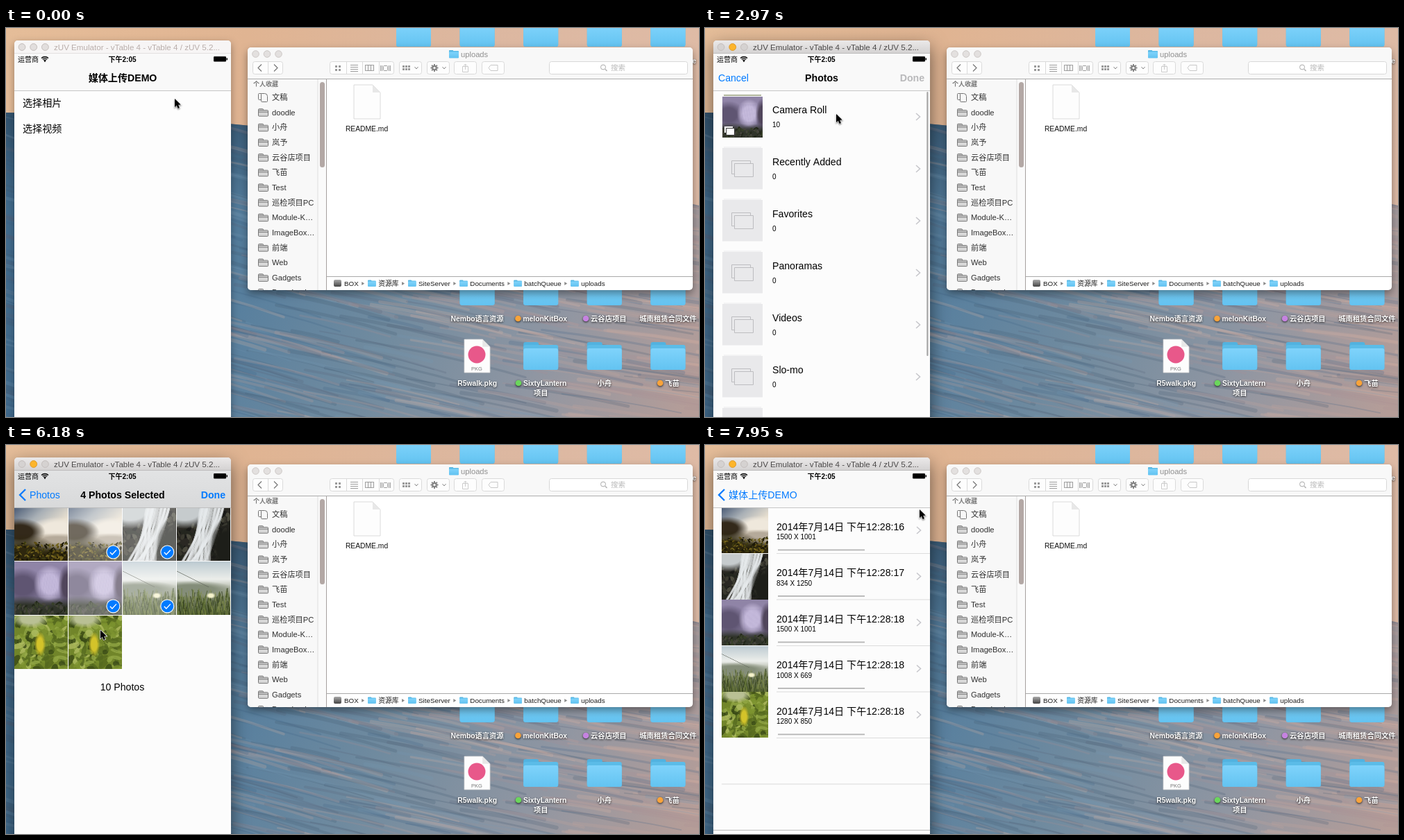
Animation of 998 by 561 pixels, one loop 8 s. Source, as an HTML page with a canvas:

```html
<!DOCTYPE html>
<html lang="zh">
<head>
<meta charset="utf-8">
<title>Media upload demo</title>
<style>
html, body { margin: 0; width: 100%; height: 100%; overflow: hidden; background: #6c859c; }
canvas { display: block; width: 998px; height: 561px; }
</style>
</head>
<body>
<canvas id="stage" width="998" height="561"></canvas>
<script>
const W = 998, H = 561, LOOP = 8000;
const FONT = '"Liberation Sans", "Noto Sans CJK SC", "Noto Sans CJK", sans-serif';
const BLUE = '#007aff';
const stage = document.getElementById('stage').getContext('2d');
let g = stage;

let seed = 7;
const rnd = (a = 0, b = 1) => {
  seed = (seed * 16807) % 2147483647;
  return a + (b - a) * seed / 2147483647;
};
const pick = list => list[Math.floor(rnd() * list.length)];
const times = (n, f) => { for (let i = 0; i < n; i++) f(i); };

// ---------- drawing helpers ----------
function offscreen(w, h, paint) {
  const c = document.createElement('canvas');
  c.width = w; c.height = h;
  const old = g;
  g = c.getContext('2d');
  paint();
  g = old;
  return c;
}
function layer(paint) { g.save(); paint(); g.restore(); }
function box(x, y, w, h, color) { g.fillStyle = color; g.fillRect(x, y, w, h); }
function ink(fill, rim, width = 1) {
  if (fill) { g.fillStyle = fill; g.fill(); }
  if (rim) { g.strokeStyle = rim; g.lineWidth = width; g.stroke(); }
}
function round(x, y, w, h, r, fill, rim) { g.beginPath(); g.roundRect(x, y, w, h, r); ink(fill, rim); }
function disc(x, y, r, fill, rim) { g.beginPath(); g.arc(x, y, r, 0, 7); ink(fill, rim); }
function path(pts) {
  g.beginPath();
  for (let i = 0; i < pts.length; i += 2) g.lineTo(pts[i], pts[i + 1]);
}
function poly(color, ...pts) { path(pts); ink(color); }
function line(color, width, ...pts) { path(pts); ink(null, color, width); }
function curve(color, width, x0, y0, cx, cy, x1, y1) {
  g.beginPath(); g.moveTo(x0, y0); g.quadraticCurveTo(cx, cy, x1, y1);
  ink(null, color, width);
}
function chevron(x, y, w, h, color, width) { line(color, width, x, y - h, x + w, y, x, y + h); }
function fade(x0, y0, x1, y1, ...colors) {
  const f = g.createLinearGradient(x0, y0, x1, y1);
  colors.forEach((c, i) => f.addColorStop(i / (colors.length - 1), c));
  return f;
}
function text(s, x, y, size, color, align = 'left', weight = '') {
  g.font = `${weight} ${size}px ${FONT}`;
  g.textAlign = align;
  g.fillStyle = color;
  g.fillText(s, x, y + size * 0.36);
  return g.measureText(s).width;
}
function shadow(color, blur, dy) { g.shadowColor = color; g.shadowBlur = blur; g.shadowOffsetY = dy; }

// ---------- photos, each in a 100 unit square ----------
function soft(x, y, rx, ry, color) {
  layer(() => {
    g.translate(x, y); g.scale(rx, ry);
    const f = g.createRadialGradient(0, 0, 0.5, 0, 0, 1);
    f.addColorStop(0, color); f.addColorStop(1, color + '00');
    disc(0, 0, 1, f);
  });
}
const specks = (n, top, size, colors) => times(n, () => {
  g.beginPath();
  g.ellipse(rnd(0, 100), rnd(top, 100), rnd(0.5, 1.5) * size, rnd(0.3, 0.7) * size, rnd(0, 3), 0, 7);
  ink(pick(colors));
});
const photos = [
  () => { // wide fall over gold bushes
    box(0, 0, 100, 100, fade(0, 0, 50, 60, '#4a5b75', '#a9b0b6', '#e9e0d0'));
    soft(80, 38, 50, 20, '#efe8dc');
    soft(80, 62, 60, 14, '#b5aa9a');
    soft(10, 46, 48, 26, '#33291a');
    soft(15, 95, 75, 45, '#2e270e');
    soft(75, 100, 60, 34, '#2e270e');
    specks(130, 66, 3, ['#5e4e14', '#75661f', '#1d1908', '#3c3a10']);
  },
  () => { // white streams between rocks
    box(0, 0, 100, 100, '#2a2823');
    specks(120, 10, 6, ['#191917', '#3a392f', '#4b4a3e', '#24261f']);
    soft(15, 8, 55, 32, '#c6cbcd');
    times(40, () => {
      const x = rnd(45, 88), end = rnd(8, 62);
      curve('rgba(232,235,237,.5)', 4, x, 0, x - 8, 40, end, 104);
    });
    soft(92, 75, 32, 55, '#1d1e19');
  },
  () => { // violet fall
    box(0, 0, 100, 100, fade(0, 0, 0, 100, '#8f84a6', '#9387ac', '#4a4658'));
    soft(15, 45, 42, 34, '#5f5572');
    soft(66, 42, 30, 36, '#cdc2e2');
    times(14, i => line('rgba(125,110,160,.25)', 1.5, 46 + i * 3, 20, 50 + i * 3, 65));
    soft(98, 45, 16, 40, '#51465c');
    soft(20, 98, 75, 34, '#30342a');
    soft(85, 98, 50, 30, '#30342a');
    specks(70, 78, 4, ['#38402a', '#23281b', '#45443c']);
  },
  () => { // grass with a flower
    box(0, 0, 100, 100, fade(0, 0, 0, 100, '#bccad1', '#eceeeb', '#7b8468', '#48552c'));
    soft(30, 52, 80, 16, '#848d79');
    times(160, () => {
      const x = rnd(0, 100), y = rnd(68, 112);
      line(pick(['#46572399', '#72823f99', '#2c371699', '#8a925299']), 1.6, x, y, x + rnd(-6, 6), y - 18);
    });
    line('#5d6258', 0.8, 0, 18, 60, 48);
    soft(64, 64, 9, 6, '#f6f3cc');
  },
  () => { // sunlit leaves
    box(0, 0, 100, 100, '#71852a');
    specks(130, 0, 9, ['#93a845cc', '#55691fcc', '#aebb60cc', '#3a4a16cc', '#7d9430cc']);
    soft(30, 6, 35, 18, '#b9c094');
    soft(48, 54, 11, 24, '#d3c32a');
  }
].map(paint => offscreen(160, 160, () => { g.scale(1.6, 1.6); paint(); }));

// ---------- desktop ----------
function folder(x, y, s = 1) {
  layer(() => {
    g.translate(x, y); g.scale(s, s);
    round(0, 0, 22, 12, 3, '#52b2df');
    round(0, 4, 50, 36, 3, '#5bbce8');
    round(0, 9, 50, 31, 3, fade(0, 9, 0, 40, '#7fd3fb', '#63c3f1'));
  });
}
// dot and text are centred together
function caption(s, x, y, dot) {
  layer(() => {
    shadow('rgba(0,0,0,.8)', 3, 1);
    const w = text(s, x + (dot ? 6 : 0), y, 10.3, '#fff', 'center', 'bold');
    if (dot) disc(x - w / 2 - 1, y, 4.3, dot);
  });
}
function paper(x, y, w, h) {
  const r = x + w, fold = w * 0.29;
  g.beginPath();
  path([x, y, r - fold, y, r, y + fold, r, y + h, x, y + h, x, y]);
  ink('#fdfdfd', '#d2d2d2', 0.8);
  poly('#e8e8e8', r - fold, y, r, y + fold, r - fold, y + fold);
}
function wallpaper() {
  box(0, 0, W, H, fade(0, 0, W, 200, '#e5bd99', '#e0b492', '#dcb7a0', '#dfbba6'));
  layer(() => {
    g.beginPath();
    g.moveTo(0, 122); g.quadraticCurveTo(480, 125, W, 256); g.lineTo(W, H); g.lineTo(0, H);
    g.clip();
    box(0, 0, W, H, fade(200, 150, W, 520, '#426c8e', '#577f9e', '#718b9f', '#9096a2', '#b59d98'));
    box(0, 110, W, 150, fade(0, 110, 0, 260, 'rgba(35,62,84,.6)', 'rgba(35,62,84,0)'));
    g.lineCap = 'round';
    times(700, () => {
      const x = rnd(-120, 1030), y = rnd(110, 580);
      const len = rnd(60, 260), drop = len * (0.32 - x * 0.0002);
      const warm = rnd() < x / 1300;
      const color = warm ? pick(['#e0b4a2', '#c8a49c', '#a98f94']) : pick(['#3f566f', '#3c6286', '#7497b2', '#565f76']);
      curve(color + '38', rnd(1, 6), x, y, x + len / 2, y + drop * 0.35, x + len, y + drop);
    });
  });
}
function icons() {
  const col = i => 587 + i * 91.6;
  for (const row of [0, 4, 5])
    for (let i = Math.max(0, row - 3); i < 5; i++) folder(col(i) - 25, row * 93.2 - 13);
  caption('e', 991, 47);
  const orange = '#f9a33a', purple = '#c583e0', green = '#6bd65c';
  [['Nembo语言资源'], ['melonKitBox', orange], ['云谷店项目', purple], ['城南租赁合同文件']]
    .forEach(([s, dot], i) => caption(s, col(i + 1), 419, dot));
  [['R5walk.pkg'], ['SixtyLantern', green], ['小舟'], ['飞苗', orange]]
    .forEach(([s, dot], i) => caption(s, col(i + 1), 512, dot));
  caption('项目', col(2), 526);
  paper(660, 449, 37, 48);
  disc(678, 471, 12.5, '#e8588a');
  text('PKG', 678, 491, 7.5, '#777', 'center');
}
function toolbar() {
  const dark = '#9a9a9a', rim = '#dadada';
  for (const x of [355, 466, 566, 606, 645, 685])
    round(x + 0.5, 48.5, x === 355 ? 43 : x === 466 ? 92 : 32, 18, 3, '#fdfdfd', rim);
  for (const x of [377, 490, 513, 537]) box(x, 49, 1, 18, rim);
  chevron(368, 57.5, -5, 5, '#777', 1.2);
  chevron(386, 57.5, 5, 5, '#777', 1.2);
  times(4, i => {
    box(474 + (i % 2) * 5, 54 + (i >> 1) * 5, 3, 3, dark);
    box(496, 53 + i * 3, 11, 1, dark);
    box(517 + i * 4, 53, 1, 9, dark);
    box(539 + i * 2 + (i > 1) * 8, 54, 1, 8, dark);
  });
  round(517.5, 53.5, 12, 8, 1, null, dark);
  round(543.5, 54.5, 6, 7, 1, null, dark);
  times(6, i => box(571 + (i % 3) * 4, 54 + (i > 2) * 4, 3, 3, dark));
  times(4, i => {
    const c = Math.cos(i * Math.PI / 4) * 5.5, s = Math.sin(i * Math.PI / 4) * 5.5;
    line('#858585', 2, 617 - c, 57.5 - s, 617 + c, 57.5 + s);
  });
  disc(617, 57.5, 3.8, '#858585');
  disc(617, 57.5, 1.6, '#fdfdfd');
  for (const x of [591, 631]) line('#888', 1, x - 2.5, 56, x, 59, x + 2.5, 56);
  round(657.5, 55.5, 8, 8, 0, null, '#ccc');
  line('#ccc', 1, 659, 54.5, 661.5, 52, 664, 54.5);
  box(661, 52, 1, 8, '#ccc');
  line('#c8c8c8', 1, 695, 57.5, 698, 53.5, 708, 53.5, 708, 61.5, 698, 61.5, 695, 57.5);
  round(782.5, 48.5, 199, 18, 3, '#fff', '#d8d8d8');
  disc(860, 56.5, 3.5, null, '#aaa');
  line('#aaa', 1.2, 863, 59.5, 865.5, 62);
  text('搜索', 871, 57.5, 10.5, '#b9b9b9');
}
function sidebar() {
  box(348, 74, 101, 304, '#f8f8f8');
  box(449, 74, 12, 304, '#fafafa');
  box(448.5, 74, 1, 304, '#dedede');
  box(461, 74, 1, 304, '#a5a09e');
  round(452, 78, 7, 123, 3.5, '#b3a8a5');
  text('个人收藏', 356, 81, 9, '#777', 'left', 'bold');
  const names = '文稿 doodle 小舟 岚予 云谷店项目 飞苗 Test 巡检项目PC Module-K… ImageBox… 前端 Web Gadgets Downloads';
  names.split(' ').forEach((s, i) => {
    const y = 100 + i * 21.65, rim = '#737373';
    if (i) {
      round(363.5, y - 5, 7, 4, 1, '#d7d7d7', rim);
      round(363.5, y - 3, 14, 8.5, 1, '#d7d7d7', rim);
      line(rim, 1, 364, y - 0.5, 377, y - 0.5);
    } else {
      round(363.5, 94.5, 7, 9, 1, '#f8f8f8', rim);
      round(367.5, 94.5, 9, 12, [1, 4, 1, 1], '#f8f8f8', rim);
    }
    text(s, 383, y, 11.2, '#2f2f2f');
  });
}
function finder() {
  layer(() => { shadow('rgba(0,0,0,.4)', 12, 5); round(348, 28, 641, 350, 5, '#fff'); });
  layer(() => {
    g.beginPath(); g.roundRect(348, 28, 641, 350, 5); g.clip();
    box(348, 28, 641, 45, '#f8f8f8');
    times(3, i => disc(359.5 + i * 16.5, 37.5, 4.8, '#e3e0df', '#cbc6c4'));
    folder(638, 32, 0.28);
    text('uploads', 655, 38, 11.2, '#8f8f8f');
    toolbar();
    box(348, 73, 641, 1, '#adadad');
    sidebar();
    paper(501, 82, 38, 49);
    text('README.md', 519.5, 145.5, 10.3, '#111', 'center');
    box(462, 358, 527, 1, '#a9a9a9');
    round(472, 363, 11, 10, 2, fade(0, 363, 0, 373, '#aaa', '#444'));
    let x = 472;
    'BOX 资源库 SiteServer Documents batchQueue uploads'.split(' ').forEach((s, i) => {
      if (i) {
        folder(x, 363.5, 0.23);
        poly('#8a8a8a', x - 9, 366, x - 5, 368.5, x - 9, 371);
      }
      x += 28.5 + text(s, x + 15, 368.5, 9.8, '#1c1c1c');
    });
  });
}
const desk = offscreen(W, H, () => { wallpaper(); icons(); finder(); });

// ---------- timing ----------
const tick = t => Math.max(0, Math.floor((t - 30) / 60) * 60 + 30);
function spring(ms) {
  const k = ms * 0.0285;
  return k <= 0 ? 0 : k > 7 ? 1 : 1 - (1 + k) * Math.exp(-k);
}
const ACTIVE = 1770, TAP = 2030, OPEN = 2346, ROLL = 4280, DONE = 6740, CLOSE = 6912, RESULTS = 7640;

// pointer moves: start, end, x, y
const moves = [
  [0, 210, 249, 103], [930, 1590, 80, 111], [2110, 2550, 206, 112], [2790, 2970, 189, 124],
  [4330, 4700, 133, 123], [5190, 5320, 212, 125], [5400, 5540, 212, 205], [5610, 5730, 136, 205],
  [5800, 6150, 136, 267], [6310, 6560, 301, 66], [DONE, 6990, 327, 84], [7400, 7860, 309, 93]
];
// photos tapped: time, cell
const taps = [[4890, 1], [5340, 2], [5600, 6], [5795, 5], [6240, 9]];

function pointer(t) {
  let x = 243, y = 102;
  for (const [a, b, tx, ty] of moves) {
    const u = Math.min(1, Math.max(0, (t - a) / (b - a))), e = u * u * (3 - 2 * u);
    x += (tx - x) * e;
    y += (ty - y) * e;
  }
  layer(() => {
    g.translate(x, y);
    shadow('rgba(0,0,0,.4)', 2, 1);
    path([0, 0, 0, 12, 2.8, 9.5, 4.7, 14, 6.9, 13, 5, 8.7, 8.7, 8.6, 0, 0]);
    ink(null, '#fff', 1.6);
    ink('#000');
  });
}

// ---------- phone ----------
const ui = (s, x, y, color = '#000', align, weight) => text(s, x, y, 14.1, color, align, weight);
const title = s => ui(s, 168, 72, '#000', 'center', 'bold');
const more = (x, y) => chevron(x, y, 5.5, 5, '#c7c7cc', 1.6);
function bar(color) {
  box(12, 37, 312, 53.5, color);
  box(12, 90, 312, 0.8, '#b9b9b9');
}
function back(s) {
  chevron(28, 72, -8, 8, BLUE, 2.3);
  ui(s, 34, 72, BLUE);
}
function shifted(dx, alpha, paint) {
  if (alpha > 0) layer(() => { g.globalAlpha = alpha; g.translate(dx, 0); paint(); });
}
// slides the next page in over the current one
function push(p, current, next) {
  if (p < 1) layer(() => {
    g.translate(-94 * p, 0);
    current();
    box(12, 37, 406, 524, `rgba(0,0,0,${0.1 * p})`);
  });
  if (p > 0) layer(() => { g.translate(312 * (1 - p), 0); box(12, 37, 312, 524, '#fcfcfc'); next(); });
}

function menu(t) {
  box(12, 37, 312, 524, '#fdfdfd');
  if (t >= ACTIVE) for (let y = 126; y < H; y += 36.6) box(24, y, 300, 1, '#e0e0e0');
  if (t >= TAP) box(12, 90.5, 312, 36, '#d9d9d9');
  ui('选择相片', 24, 108);
  ui('选择视频', 24, 144.5);
}
function results() {
  const sizes = ['1500 X 1001', '834 X 1250', '1500 X 1001', '1008 X 669', '1280 X 850'];
  sizes.forEach((size, i) => {
    const y = 90 + i * 66.5;
    g.drawImage(photos[i], 24, y, 67, 66);
    ui('2014年7月14日 下午12:28:' + Math.min(18, 16 + i), 103, y + 27.5);
    text(size, 103, y + 42.5, 10, '#000');
    box(105, y + 60.5, 125, 1.8, '#b5b5b5');
    more(305, y + 33);
    box(103, y + 66, 221, 1, '#dcdcdc');
  });
  box(24, 488.5, 300, 1, '#dcdcdc');
  box(12, 555, 312, 1, '#bcbcbc');
}
function albums(t) {
  box(12, 37, 312, 524, '#fcfcfc');
  if (t >= 3840) box(12, 90.5, 312, 75, '#d9d9d9');
  ['Camera Roll', 'Recently Added', 'Favorites', 'Panoramas', 'Videos', 'Slo-mo', 'Bursts'].forEach((s, i) => {
    const y = 90 + i * 75, pale = '#e9e9eb';
    box(27, y + 6.5, 54, 1, i ? '#ececee' : '#66703f');
    if (i) {
      box(25, y + 8, 58, 59.5, pale);
      round(38.5, y + 26.5, 27, 19, 0, pale, '#bdbdc0');
      round(42.5, y + 30.5, 27, 19, 0, pale, '#bdbdc0');
    } else {
      g.drawImage(photos[2], 25, 98.5, 58, 59);
      box(28, 142, 12, 9, '#fff');
      round(30.5, 144.5, 12, 10, 0, '#fff', '#333');
    }
    ui(s, 97, y + 28);
    text(i ? '0' : '10', 97, y + 49.5, 10, '#000');
    more(304, y + 38);
  });
  if (t >= 2850 && t < 3650) round(319.3, 92, 2.2, 381, 1, '#a5a5a5');
}
function grid(tapped) {
  times(10, i => {
    const x = 12 + (i % 4) * 77.9, y = 90 + Math.floor(i / 4) * 77.9;
    g.drawImage(photos[i >> 1], x, y, 77, 77);
    if (!tapped.includes(i)) return;
    box(x, y, 77, 77, 'rgba(255,255,255,.3)');
    disc(x + 64.5, y + 64.5, 10, '#fff');
    disc(x + 64.5, y + 64.5, 8.9, BLUE);
    line('#fff', 1.4, x + 60, y + 64.8, x + 63, y + 68, x + 69, y + 61.5);
  });
  ui('10 Photos', 167.5, 349, '#000', 'center');
}
function picker(t) {
  const p = spring(t - ROLL);
  const tapped = taps.filter(k => t >= k[0]).map(k => k[1]), n = tapped.length;
  push(p, () => albums(t), () => grid(tapped));
  bar(n ? fade(0, 37, 0, 90, '#e2e3e4', '#d8d9da') : '#f9f9f9');
  shifted(-110 * p, 1 - p, () => title('Photos'));
  shifted(0, 1 - p, () => ui('Cancel', 19, 72, BLUE));
  shifted(130 * (1 - p), p, () => back('Photos'));
  shifted(150 * (1 - p), p, () => title(n ? `${n} Photo${n > 1 ? 's' : ''} Selected` : 'Camera Roll'));
  ui('Done', 316, 72, !n ? '#b9b9bb' : t > DONE ? '#62a9f5' : BLUE, 'right', 'bold');
}
function status() {
  text('运营商', 17, 45, 10, '#000');
  times(3, i => {
    g.beginPath(); g.arc(56, 48.5, 2.2 + i * 2.4, -2.35, -0.79);
    ink(null, '#000', 1.5);
  });
  disc(56, 48, 1, '#000');
  text('下午2:05', 167.5, 45, 10, '#000', 'center', 'bold');
  round(299, 41, 18, 7.5, 1.2, '#000');
  box(317.5, 43.3, 1.5, 3, '#000');
}
function frameOf(active) {
  const top = [5, 5, 0, 0];
  layer(() => {
    shadow(`rgba(0,0,0,${active ? 0.55 : 0.35})`, active ? 26 : 12, active ? 9 : 4);
    round(12, 18, 312, 600, top, '#f6f6f6');
  });
  round(12, 18, 312, 19, top, active ? fade(0, 18, 0, 37, '#ebe9e9', '#d3d1d1') : '#f7f5f5');
  box(12, 36.3, 312, 0.7, active ? '#b5b3b3' : '#dcd8d8');
  times(3, i => {
    const lit = active && i === 1;
    disc(23 + i * 16.7, 27.5, 4.9, lit ? '#fdb52b' : active ? '#d5d2d1' : '#e2dedd', lit ? '#dd9a2b' : '#c4bebc');
  });
  text('zUV Emulator - vTable 4 - vTable 4 / zUV 5.2...', 69, 28, 11.6, active ? '#4c4a4a' : '#b9aeab');
}
function phone(t) {
  frameOf(t >= ACTIVE);
  layer(() => {
    g.beginPath(); g.rect(12, 37, 312, 524); g.clip();
    const p = spring(t - RESULTS);
    push(p, () => menu(t), results);
    bar('#f9f9f9');
    shifted(-88 * p, 1 - p, () => title('媒体上传DEMO'));
    shifted(85 * (1 - p), p, () => back('媒体上传DEMO'));
    const drop = 524 * (1 - spring(t - OPEN) + spring(t - CLOSE));
    if (drop < 524) layer(() => { g.translate(0, drop); picker(t); });
    status();
  });
}

let start;
function frame(now) {
  start ??= now;
  const t = tick((now - start) % LOOP);
  g.drawImage(desk, 0, 0);
  phone(t);
  pointer(t);
  requestAnimationFrame(frame);
}
requestAnimationFrame(frame);
</script>
</body>
</html>
```
